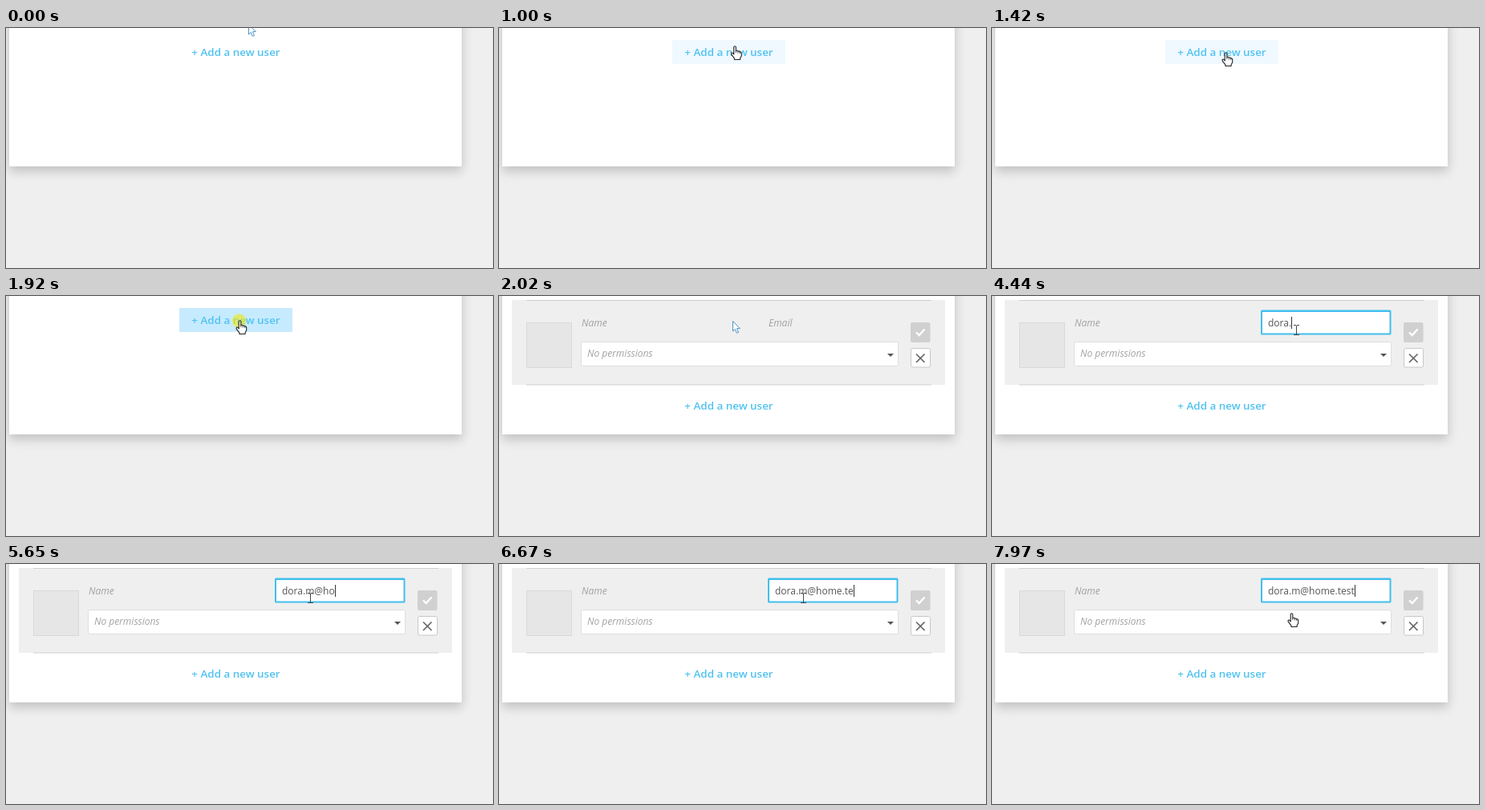
An HTML page with a canvas for the animation above (8000 ms loop, 607 by 300 pixels).

```html
<!DOCTYPE html>
<html lang="en">
<head>
<meta charset="utf-8">
<title>Add a user</title>
<style>
  html, body { margin: 0; width: 100%; height: 100%; overflow: hidden; background: #efefef; }
  canvas { display: block; }
</style>
</head>
<body>
<canvas id="stage" width="607" height="300"></canvas>
<script>
const ctx = document.getElementById('stage').getContext('2d');
const LOOP = 8000;
const FONT = '"Open Sans", "Noto Sans", sans-serif';
const EMAIL = 'dora.m@home.test';

// Moments at which each character appears
const KEYS = [3440, 3740, 3840, 4040, 4440, 4950, 5250, 5550,
              5650, 5850, 5950, 6150, 6370, 6670, 6770, 6870];

const FORM_AT = 2020, FOCUS_AT = 2920;

// Pointer: start time, shape, hotspot
const POINTER = [
  [0, arrow, 302, -5], [600, arrow, 301, 0], [700, arrow, 299, 7],
  [800, hand, 297, 14], [900, hand, 295.5, 18.5], [1000, hand, 294, 22.5],
  [1100, hand, 293, 25.5], [1200, hand, 292.3, 28], [1320, hand, 291.7, 29.5],
  [1420, hand, 291.5, 30.5], [FORM_AT, arrow, 291, 31],
  [2620, beam, 345, 39], [2720, beam, 379, 42],
  [7770, beam, 377, 48], [7870, hand, 375, 57], [7970, hand, 373.5, 61.5]
];

const within = (t, a, b) => t >= a && t < b;

function box(x, y, w, h, fill, stroke, width = 1) {
  ctx.fillStyle = fill;
  ctx.fillRect(x, y, w, h);
  if (!stroke) return;
  ctx.strokeStyle = stroke;
  ctx.lineWidth = width;
  ctx.strokeRect(x + width / 2, y + width / 2, w - width, h - width);
}

function rounded(x, y, w, h, r, fill, stroke) {
  ctx.beginPath();
  ctx.roundRect(x, y, w, h, r);
  ctx.fillStyle = fill;
  ctx.fill();
  if (!stroke) return;
  ctx.strokeStyle = stroke;
  ctx.lineWidth = 1;
  ctx.stroke();
}

function line(points, color, width) {
  ctx.beginPath();
  points.forEach(([x, y]) => ctx.lineTo(x, y));
  ctx.strokeStyle = color;
  ctx.lineWidth = width;
  ctx.stroke();
}

function text(str, x, y, color, style, align = 'left') {
  ctx.font = `${style} ${FONT}`;
  ctx.textAlign = align;
  ctx.fillStyle = color;
  ctx.fillText(str, x, y);
}

function shape(x, y, d, stroke, width) {
  ctx.save();
  ctx.translate(x, y);
  const path = new Path2D(d);
  ctx.lineJoin = 'round';
  ctx.fillStyle = '#fff';
  ctx.fill(path);
  ctx.strokeStyle = stroke;
  ctx.lineWidth = width;
  ctx.stroke(path);
  ctx.restore();
}

function arrow(x, y) {
  shape(x, y, 'M.5.5V13L3.3 10.4L5.3 15.3L7.5 14.4L5.5 9.6H9.3Z', '#4f94c4', 1);
}

function hand(x, y) {
  shape(x, y, 'M-1.3 10.5V1.5Q-1.2.3 0 .3Q1.2.3 1.3 1.5V6Q3.4 5.3 3.8 6.7' +
    'Q5.7 6 6.2 7.4Q8.2 7 8.2 9V12.5L6.6 15.3V17H-.6V15.4L-4.3 10.7' +
    'Q-5 9.2-3.8 8.6Q-2.8 8.3-1.3 10.5Z', '#222', 1.1);
  line([[x + 1.3, y + 6], [x + 1.3, y + 8.5]], '#222', .8);
  line([[x + 3.8, y + 6.7], [x + 3.8, y + 9]], '#222', .8);
  line([[x + 6.2, y + 7.4], [x + 6.2, y + 9.5]], '#222', .8);
}

function beam(x, y) {
  ctx.fillStyle = '#444';
  ctx.fillRect(x, y - 5, 1, 12);
  for (const end of [y - 6, y + 6]) {
    ctx.fillRect(x - 3, end, 3, 1);
    ctx.fillRect(x + 1, end, 3, 1);
  }
}

function glow(x, y) {
  ctx.beginPath();
  ctx.arc(x, y, 8.7, 0, Math.PI * 2);
  ctx.fillStyle = 'rgba(238, 232, 20, .62)';
  ctx.fill();
}

function card() {
  box(0, 0, 607, 300, '#efefef');
  ctx.save();
  ctx.shadowColor = 'rgba(0, 0, 0, .2)';
  ctx.shadowBlur = 13;
  ctx.shadowOffsetY = 6;
  box(4, -40, 564, 213, '#fff');
  ctx.restore();
}

function addLink(t) {
  const open = t >= FORM_AT;
  if (within(t, 800, FORM_AT)) {
    const fill = t >= 1920 ? '#c7ebfe' : t >= 1820 ? '#d8f1fe' : t >= 900 ? '#eff9ff' : '#f7fcff';
    box(216, 15, 141, 30, fill);
  }
  text('+ Add a new user', 286.5, open ? 142 : 35, '#50c2f1', '600 13.4px', 'center');
}

function emailField(t) {
  if (t < FOCUS_AT) {
    text('Email', 336, 38, '#a2a2a2', 'italic 12px');
    return;
  }
  rounded(335, 17.5, 162.5, 31, 1.5, '#41bfee');
  box(337, 20, 158.5, 26.5, '#fff');
  const typed = EMAIL.slice(0, KEYS.filter(k => t >= k).length);
  if (typed) text(typed, 344, 38, '#555', '12px');
  else text('Email', 344, 38, '#bcbcb4', 'italic 10.6px');
  if (within(t, 7470, 7970)) return;
  ctx.font = `12px ${FONT}`;
  const end = Math.round(344 + ctx.measureText(typed).width);
  box(end, 26, 1, 15, '#333');
}

function form(t) {
  box(16, 5, 540, 106, '#efefef');
  box(34, 5, 505, 1, '#cfcfcf');
  box(34, 110.5, 505, 1, '#cfcfcf');
  box(34, 33, 57, 57, '#e6e6e6', '#d9d9d9');
  text('Name', 103, 38, '#a2a2a2', 'italic 12px');
  emailField(t);

  rounded(102.5, 57.5, 395, 30, 2, '#fff', '#dedede');
  text('No permissions', 110, 76, '#a2a2a2', 'italic 12px');
  ctx.beginPath();
  ctx.moveTo(484, 72);
  ctx.lineTo(492, 72);
  ctx.lineTo(488, 76);
  ctx.fillStyle = '#555';
  ctx.fill();

  rounded(513, 33, 24.5, 25, 2, '#d0d0d0');
  line([[520, 45.5], [523.7, 49], [530.5, 41.5]], '#fff', 2.4);
  rounded(513.5, 65.5, 24, 23.5, 2, '#fff', '#c8c8c8');
  line([[520, 72.5], [530.5, 83]], '#666', 1.7);
  line([[530.5, 72.5], [520, 83]], '#666', 1.7);
}

function draw(t) {
  card();
  if (t >= FORM_AT) form(t);
  addLink(t);
  if (within(t, 1820, FORM_AT)) glow(290.5, 31);
  if (within(t, FOCUS_AT, 3040)) glow(378.5, 42);
  const [, pointer, x, y] = POINTER.findLast(p => t >= p[0]);
  pointer(x, y);
}

const start = performance.now();
function tick() {
  draw((performance.now() - start) % LOOP);
  requestAnimationFrame(tick);
}
tick();
</script>
</body>
</html>
```
